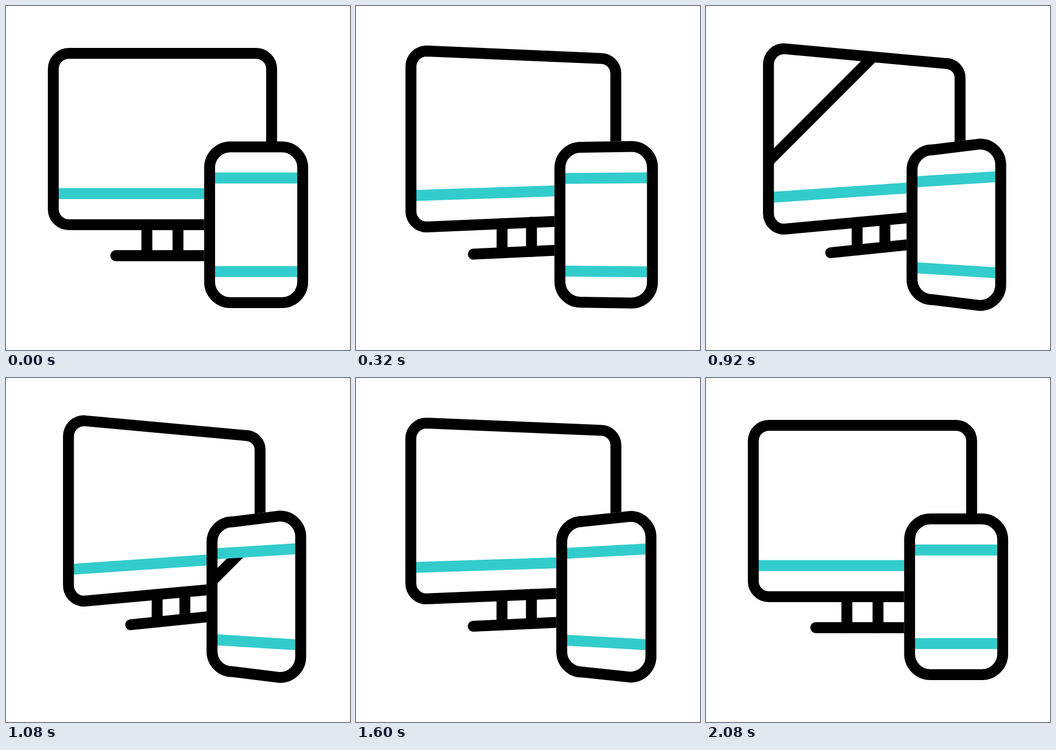
An HTML page for the animation above (2560 ms loop, 640 px wide and 640 px high).

```html
<!DOCTYPE html>
<html lang="en">
<head>
<meta charset="utf-8">
<title>Monitor and phone</title>
<style>
  html, body { margin: 0; height: 100%; overflow: hidden; background: #fff; }
  svg { display: block; width: 100%; height: 100%; }

  path { fill: none; stroke: #000; stroke-width: 20.3; stroke-linecap: round; stroke-linejoin: round; }
  .bar { stroke: #33cccc; }
  .cover { fill: #fff; stroke: #fff; }

  .monitor .morph { animation: turn-monitor 2560ms infinite; }
  .phone .morph { animation: turn-phone 2560ms infinite; }
  .monitor .shine { animation: shine-monitor 2560ms infinite; }
  .phone .shine { animation: shine-phone 2560ms infinite; }
  .morph, .shine { animation-timing-function: cubic-bezier(.65, 0, .35, 1) !important; }

  /* --a is the flat pose, --b the turned one */
  @keyframes turn-monitor {
    0%, 75%, 100% { d: var(--a); }
    25%, 50% { d: var(--b); }
  }
  @keyframes turn-phone {
    0%, 4.6875%, 79.6875%, 100% { d: var(--a); }
    29.6875%, 54.6875% { d: var(--b); }
  }
  @keyframes shine-monitor {
    0%, 25% { transform: translate(92.5px, 92.5px); }
    50%, 100% { transform: translate(420px, 420px); }
  }
  @keyframes shine-phone {
    0%, 32.8125% { transform: translate(338px, 338px); }
    57.8125%, 100% { transform: translate(539.5px, 539.5px); }
  }
</style>
</head>
<body>
<svg viewBox="0 0 640 640">
  <clipPath id="monitor-screen">
    <path d="M116 356V108.5Q116 79.5 145 79.5L446 107Q473 107 473 133V332Z"/>
  </clipPath>
  <clipPath id="phone-screen">
    <path d="M383 327.5L548 317V497L383 486.5Z"/>
  </clipPath>

  <g class="monitor">
    <g clip-path="url(#monitor-screen)"><path class="shine" d="M-700 700L700 -700"/></g>
    <path class="morph bar" data-shape="monitorBar"/>
    <path class="morph" data-shape="legs"/>
    <path class="morph" data-shape="base"/>
    <path class="morph" data-shape="monitor"/>
  </g>

  <g class="phone">
    <path class="morph cover" data-shape="phone"/>
    <g clip-path="url(#phone-screen)"><path class="shine" d="M-700 700L700 -700"/></g>
    <path class="morph bar" data-shape="phoneBars"/>
    <path class="morph" data-shape="phone"/>
  </g>
</svg>
<script>
  const line = (x1, y1, x2, y2) => `M${x1} ${y1}L${x2} ${y2}`;

  // Rounded frame, mirrored about mid: side radii rl, rr and side half heights hl, hr.
  function frame(left, right, rl, rr, mid, hl, hr) {
    const kl = rl * 0.448, kr = rr * 0.448;
    const lx = left + rl, rx = right - rr;
    const top = mid - hl, bottom = mid + hl;
    const topR = mid - hr, bottomR = mid + hr;
    return `M${left} ${top + rl}` +
      `C${left} ${top + kl} ${left + kl} ${top} ${lx} ${top}` +
      `L${rx} ${topR}` +
      `C${right - kr} ${topR} ${right} ${topR + kr} ${right} ${topR + rr}` +
      `L${right} ${bottomR - rr}` +
      `C${right} ${bottomR - kr} ${right - kr} ${bottomR} ${rx} ${bottomR}` +
      `L${lx} ${bottom}` +
      `C${left + kl} ${bottom} ${left} ${bottom - kl} ${left} ${bottom - rl}Z`;
  }

  const shapes = {
    monitor: [
      frame(88, 494.2, 29, 29, 247.5, 159.4, 159.4),
      frame(116.2, 472.7, 29, 26.6, 247.3, 167.8, 140.3)
    ],
    monitorBar: [line(88, 349, 494, 349), line(116.2, 356.4, 472.7, 331.8)],
    legs: [
      line(262.1, 407, 262.1, 464.5) + line(320, 407, 320, 464.5),
      line(281.2, 402.8, 281.2, 454) + line(332.8, 398.1, 332.8, 448.6)
    ],
    base: [line(204.3, 464.5, 436, 464.5), line(232, 459, 420, 439.6)],
    phone: [
      frame(378.8, 552, 38.7, 38.7, 407, 144.9, 144.9),
      frame(383.3, 548.3, 37.5, 38.5, 407, 139.3, 150.2)
    ],
    phoneBars: [
      line(378.8, 320, 552, 320) + line(378.8, 494.2, 552, 494.2),
      line(383.3, 327.5, 548.3, 317.2) + line(383.3, 486.5, 548.3, 496.9)
    ]
  };

  for (const el of document.querySelectorAll('.morph')) {
    const [flat, turned] = shapes[el.dataset.shape];
    el.setAttribute('d', flat);
    el.style.setProperty('--a', `path("${flat}")`);
    el.style.setProperty('--b', `path("${turned}")`);
  }
</script>
</body>
</html>
```
